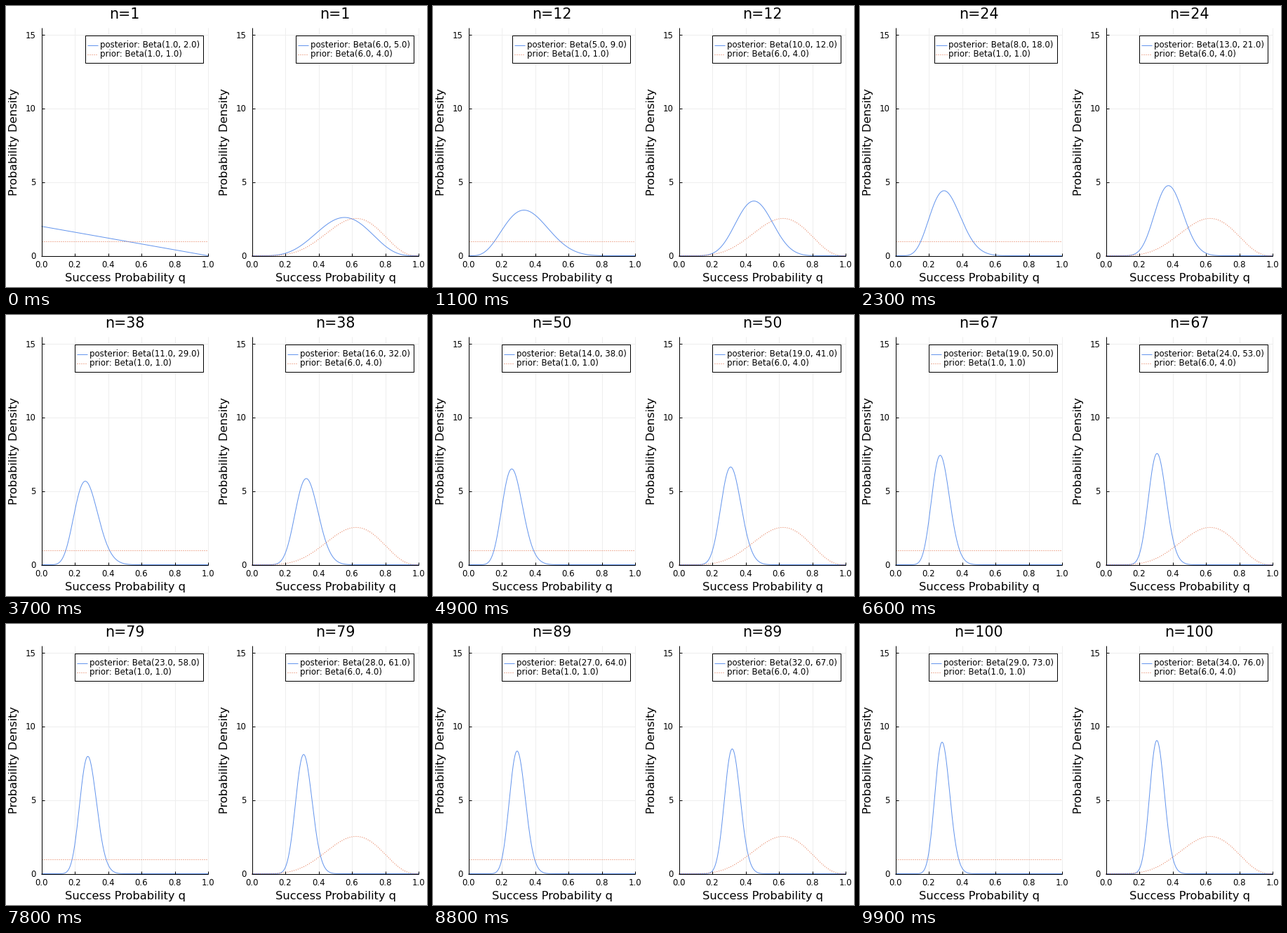
A matplotlib script that plays this animation: 600x400 px, repeating every 10 s.

```python
from math import exp, lgamma

import matplotlib.pyplot as plt
import numpy as np
from matplotlib.animation import FuncAnimation
from matplotlib.patches import Rectangle

W, H, DPI = 600, 400, 100
PT = 72 / DPI                        # points per pixel
BLUE, ORANGE, GRID = "#6495ed", "#e36f47", "#eeeeee"
SMALL, MEDIUM, LARGE = 11.8, 16.25, 20.6
DIGIT = 0.636 * SMALL                # advance of one digit in the legend

X0, SPAN = 50.5, 237.5               # plot area of the left panel
Y0, UNIT, TOP = 355.5, 20.94, 31
PANEL = 300

# Trials that ended in a success
HITS = [3, 6, 8, 11, 15, 20, 24, 28, 32, 38, 45, 49, 50, 57,
        60, 62, 64, 66, 68, 71, 75, 79, 82, 84, 86, 88, 90, 94]

plt.rcParams["font.family"] = "DejaVu Sans"
fig = plt.figure(figsize=(W / DPI, H / DPI), dpi=DPI, facecolor="white")
ax = fig.add_axes([0, 0, 1, 1])
ax.set(xlim=(0, W), ylim=(H, 0))
ax.axis("off")

q = np.linspace(0, 1, 600)


def density(a, b):
    scale = exp(lgamma(a + b) - lgamma(a) - lgamma(b))
    return scale * q ** (a - 1) * (1 - q) ** (b - 1)


def to_y(p):
    return Y0 - UNIT * p


def stroke(xs, ys, color="black", z=2, **kw):
    return ax.plot(xs, ys, color=color, lw=PT, zorder=z,
                   solid_capstyle="butt", dash_capstyle="butt", **kw)[0]


def label(x, y, s, size, ha="center", va="baseline", **kw):
    return ax.text(x, y, s, fontsize=size * PT, ha=ha, va=va, zorder=8, **kw)


class Panel:
    def __init__(self, dx, a, b):
        self.dx, self.a, self.b = dx, a, b
        self.left = X0 + dx
        self.xs = self.left + SPAN * q
        self.draw_axes()

        dots = dict(color=ORANGE, ls=(0, (1, 2)))
        stroke(self.xs, to_y(density(a, b)), z=3, **dots)
        self.curve = stroke(self.xs, to_y(0 * q), BLUE, 2.5)

        self.title = label(dx + 169.2, 18, "", LARGE)
        self.box = Rectangle((0, 41.5), 1, 39, fc="white", ec="black",
                             lw=PT, zorder=6)
        ax.add_patch(self.box)
        self.keys = [stroke([0, 1], [55.5, 55.5], BLUE, 7),
                     stroke([0, 1], [68.5, 68.5], z=7, **dots)]
        self.names = [label(0, 59.3, "", SMALL, "left"),
                      label(0, 72.3, f"prior: Beta({a:.1f}, {b:.1f})",
                            SMALL, "left")]

    def draw_axes(self):
        left, right = self.left, self.left + SPAN
        for t in np.arange(6) / 5:
            x = left + SPAN * t
            stroke([x, x], [TOP, Y0], GRID, 1)
            stroke([x, x], [Y0, Y0 - 4], z=4)
            label(x, 371.5, f"{t:.1f}", SMALL)
        for v in (0, 5, 10, 15):
            y = to_y(v)
            stroke([left, right], [y, y], GRID, 1)
            stroke([left, left + 4], [y, y], z=4)
            label(left - 8, y + 4.4, str(v), SMALL, "right")
        stroke([left, left], [TOP, Y0 + 0.5], z=4)
        stroke([left - 0.5, right], [Y0, Y0], z=4)
        label(self.dx + 169.5, 392, "Success Probability q", MEDIUM)
        label(self.dx + 16.3, 193.5, "Probability Density", MEDIUM,
              "right", "center", rotation=90,
              rotation_mode="default").set_visible(False)
        label(self.dx + 16.3, 193.5, "Probability Density", MEDIUM,
              rotation=90, rotation_mode="anchor")

    def update(self, n, k):
        a, b = self.a + k, self.b + n - k
        self.curve.set_ydata(to_y(density(a, b)))
        self.title.set_text(f"n={n}")

        extra = (a >= 10) + (b >= 10)
        x = self.dx + 113.4 - DIGIT * extra
        self.box.set_x(x)
        self.box.set_width(self.dx + 280.5 - x)
        for key in self.keys:
            key.set_xdata([x + 2.5, x + 18])
        for name in self.names:
            name.set_x(x + 20.3)
        self.names[0].set_text(f"posterior: Beta({a:.1f}, {b:.1f})")


panels = [Panel(0, 1, 1), Panel(PANEL, 6, 4)]


def draw(i):
    n = i + 1
    k = sum(h <= n for h in HITS)
    for panel in panels:
        panel.update(n, k)
    return []


anim = FuncAnimation(fig, draw, frames=100, interval=100, repeat=True,
                     repeat_delay=0, blit=False)
plt.show()
```
